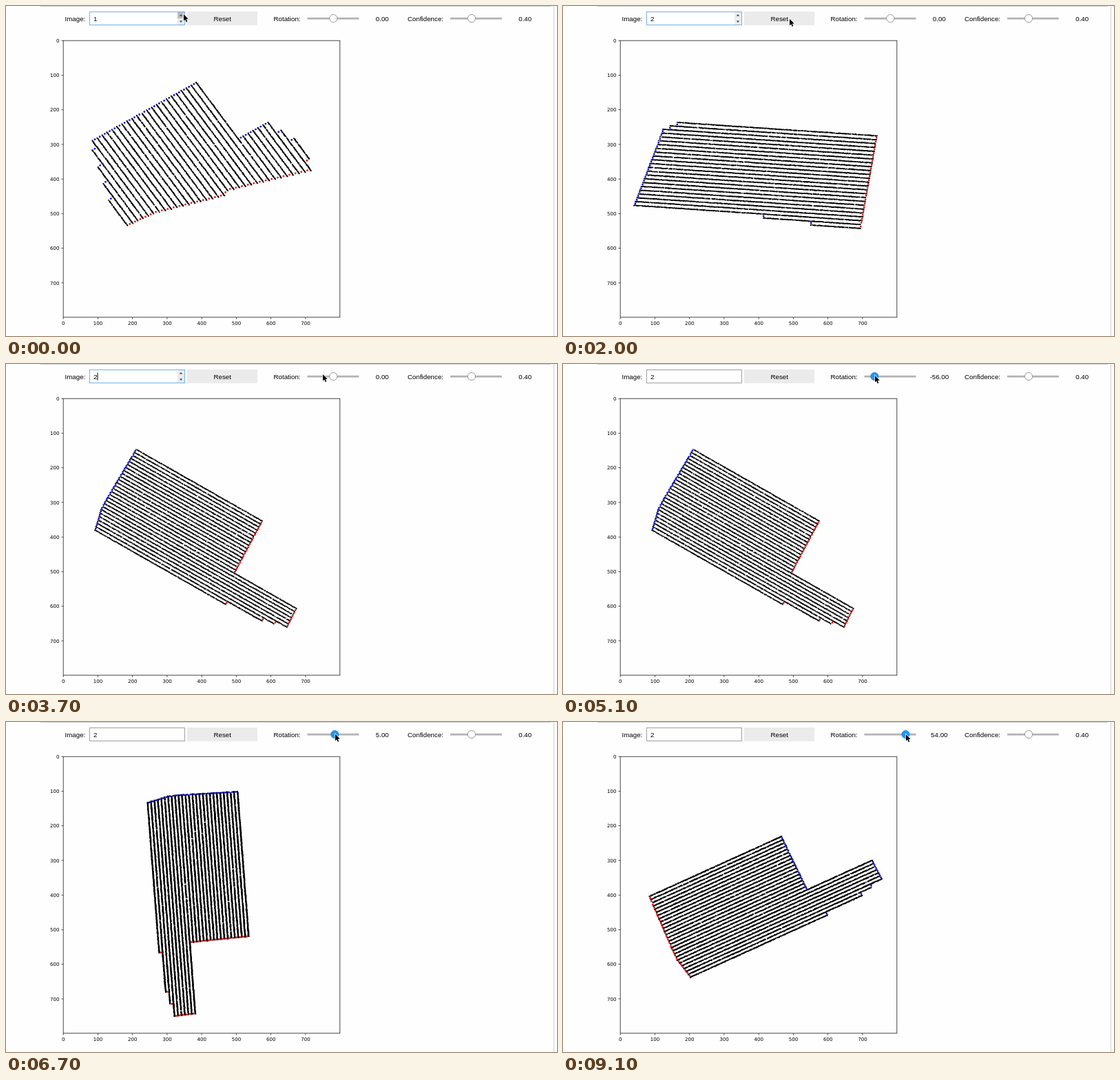
These frames come from a looping animation (800x479 px, 9900 ms). An HTML page with a canvas:

```html
<!DOCTYPE html>
<html lang="en">
<head>
<meta charset="utf-8">
<title>Row detection viewer</title>
<style>
html, body { margin: 0; width: 100%; height: 100%; overflow: hidden; background: #fefefe; }
canvas { display: block; }
</style>
</head>
<body>
<canvas id="stage" width="800" height="479"></canvas>
<script>
const ctx = document.getElementById('stage').getContext('2d');
const LOOP = 9900, CENTER = [284, 251], SCALE = 0.5025;
const UI_FONT = '9.75px "Liberation Sans", Arial, sans-serif';
const TICK_FONT = '7.1px "DejaVu Sans", sans-serif';

// Outline corners as [row index, x, y]: where rows start and where they end.
const fields = [
  { angle: 53.3, rows: 34,
    starts: [[0, 149, 282], [3, 125, 210], [4, 124, 196], [25, 276, 111],
             [26, 341, 191], [31, 381, 168], [33, 418, 192]],
    ends: [[0, 175, 320], [5, 212, 303], [17, 314, 278], [18, 322, 268], [32, 443, 239], [33, 440, 222]] },
  { angle: 3.85, rows: 25,
    starts: [[0, 166, 169], [2, 145, 179], [4, 141, 190], [22, 103, 290], [23, 291, 307], [24, 360, 318]],
    ends: [[0, 456, 188], [24, 432, 323]] },
  { angle: 29.6, rows: 27,
    starts: [[0, 189, 124], [16, 148, 193], [20, 137, 213], [26, 129, 241]],
    ends: [[0, 372, 228], [16, 334, 299], [17, 422, 354], [23, 408, 382], [25, 371, 374], [26, 319, 349]] }
];

const rad = deg => deg * Math.PI / 180;
const mix = (a, b, f) => a + (b - a) * f;
const dot = (p, q) => p[0] * q[0] + p[1] * q[1];

// Interpolates a list of [key, ...values] at the given key.
function sample(keys, at) {
  if (at <= keys[0][0]) return keys[0].slice(1);
  const i = keys.findIndex(k => k[0] >= at);
  if (i < 0) return keys[keys.length - 1].slice(1);
  const a = keys[i - 1], b = keys[i], f = (at - a[0]) / (b[0] - a[0]);
  return a.slice(1).map((v, j) => mix(v, b[j + 1], f));
}

function randomizer(seed) {
  return () => (seed = (seed * 16807) % 2147483647) / 2147483647;
}

function rotate([x, y], deg) {
  const c = Math.cos(rad(deg)), s = Math.sin(rad(deg));
  const dx = x - CENTER[0], dy = y - CENTER[1];
  return [CENTER[0] + dx * c - dy * s, CENTER[1] + dx * s + dy * c];
}

function addDot(path, [x, y]) {
  path.moveTo(x + 1.4, y);
  path.arc(x, y, 1.4, 0, 7);
}

function buildPlot({ angle, rows, starts, ends }, turn, width) {
  const rnd = randomizer(77);
  const plot = { plants: new Path2D(), top: new Path2D(), bottom: new Path2D() };
  const u = [Math.cos(rad(angle)), Math.sin(rad(angle))];
  const n = [-u[1], u[0]];
  const first = dot(sample(starts, 0), n), last = dot(sample(starts, rows - 1), n);
  const along = (corners, k) => dot(sample(corners, k), u);
  const place = (t, k) => {
    const side = mix(first, last, k / (rows - 1));
    return rotate([u[0] * t + n[0] * side, u[1] * t + n[1] * side], turn);
  };

  for (let k = 0; k < rows; k++) {
    const from = along(starts, k), to = along(ends, k);
    const a = place(from, k), b = place(to, k);
    const count = Math.round(to - from);
    for (let i = 0; i <= count; i++) {
      const w = width * mix(0.75, 1.1, rnd());
      const x = mix(a[0], b[0], i / count) + (rnd() - 0.5) * 0.6;
      const y = mix(a[1], b[1], i / count) + (rnd() - 0.5) * 0.6;
      if (rnd() > 0.06) plot.plants.rect(x - w / 2, y - w / 2, w, w);
    }
  }

  // Each gap is marked where both of its rows are present; blue is the upper end.
  const downward = Math.sin(rad(angle + turn)) > 0;
  for (let k = 0; k + 1 < rows; k++) {
    const head = Math.max(along(starts, k), along(starts, k + 1));
    const tail = Math.min(along(ends, k), along(ends, k + 1));
    addDot(plot.top, place(downward ? head : tail, k + 0.5));
    addDot(plot.bottom, place(downward ? tail : head, k + 0.5));
  }
  return plot;
}

const plots = [
  { from: 0, plot: buildPlot(fields[0], 0, 1.9) },
  { from: 700, plot: buildPlot(fields[1], 0, 1.9) },
  { from: 3300, plot: buildPlot(fields[2], 0, 1.8) },
  { from: 5700, plot: buildPlot(fields[2], 56, 2.5) },
  { from: 8200, plot: buildPlot(fields[2], -54, 2.1) }
];

const pointer = [[1900, 258, 12], [2500, 684, 52], [2900, 519, 31], [3700, 460, 15],
  [4200, 453, 17], [6200, 453, 17], [7100, 498, 18]];
const rotation = [[3900, 0], [4200, -56], [6200, -56], [7100, 54]];

function rect(x, y, w, h, fill, stroke) {
  ctx.fillStyle = fill;
  ctx.fillRect(x, y, w, h);
  if (stroke) {
    ctx.strokeStyle = stroke;
    ctx.lineWidth = 1;
    ctx.strokeRect(x + 0.5, y + 0.5, w - 1, h - 1);
  }
}

function text(str, x, y, align = 'left') {
  ctx.fillStyle = '#000';
  ctx.textAlign = align;
  ctx.fillText(str, x, y);
}

function polygon(points) {
  ctx.beginPath();
  points.forEach(([x, y]) => ctx.lineTo(x, y));
  ctx.closePath();
}

function drawSlider(left, thumb, active) {
  rect(left, 16.7, 75, 2.8, '#b3b3b3');
  ctx.beginPath();
  ctx.arc(thumb, 18, 5.6, 0, 7);
  ctx.fillStyle = active ? '#2196f3' : '#fff';
  ctx.fill();
  ctx.strokeStyle = active ? '#1e88e5' : '#999';
  ctx.lineWidth = 1;
  ctx.stroke();
}

function drawInput(t) {
  const focused = t < 4000, hover = t < 2000;
  const caret = (t + 1000) % 1100 < 500;
  rect(121, 8, 139, 20, '#fff', focused ? '#72b3ee' : '#9e9e9e');
  text(t < 1200 ? '1' : '2', 127, 21.5);
  if (!focused) return;
  if (caret) rect(132.5, 12.5, 1, 11, '#000');
  rect(249, 9, 10, 18, '#ececec');
  if (hover) rect(249, 9, 10, 9, '#bdbdbd');
  ctx.fillStyle = '#444';
  for (const dir of [-1, 1]) {
    const y = 18 + 3.5 * dir;
    polygon([[251.7, y], [256.3, y], [254, y + 2.6 * dir]]);
    ctx.fill();
  }
}

function drawToolbar(t) {
  ctx.font = UI_FONT;
  const turn = Math.round(sample(rotation, t)[0]);
  text('Image:', 85.5, 21.5);
  drawInput(t);
  rect(263, 8, 102, 20, '#ebebeb');
  text('Reset', 314.2, 21.5, 'center');
  text('Rotation:', 388.5, 21.5);
  drawSlider(437.5, 475.3 + turn * 0.41, t >= 4000);
  text(turn.toFixed(2), 546.3, 21.5, 'center');
  text('Confidence:', 583, 21.5);
  drawSlider(645, 676, false);
  text('0.40', 753.7, 21.5, 'center');
}

function drawAxes() {
  ctx.font = TICK_FONT;
  for (let v = 0; v < 800; v += 100) {
    const d = v * SCALE;
    rect(80.5, 49.8 + d, 2.5, 0.7, '#000');
    text(v, 77.5, 52.9 + d, 'right');
    rect(82.8 + d, 452, 0.7, 2.5, '#000');
    text(v, 83.2 + d, 462.6, 'center');
  }
  ctx.strokeStyle = '#333';
  ctx.lineWidth = 0.9;
  ctx.strokeRect(83.2, 50.2, 401.6, 401.6);
}

function drawPlot(t) {
  const { plot } = plots.filter(p => t >= p.from).pop();
  ctx.fillStyle = '#000';
  ctx.fill(plot.plants);
  ctx.fillStyle = '#00f';
  ctx.fill(plot.top);
  ctx.fillStyle = '#f00';
  ctx.fill(plot.bottom);
}

function drawPointer(t) {
  const [x, y] = sample(pointer, t);
  const arrow = [[0, 0], [0, 9.6], [2.2, 7.6], [3.7, 11.2], [5.3, 10.5], [3.8, 7.1], [6.7, 6.8]];
  polygon(arrow.map(([dx, dy]) => [x + dx, y + dy]));
  ctx.strokeStyle = '#fff';
  ctx.lineWidth = 1.4;
  ctx.stroke();
  ctx.fillStyle = '#000';
  ctx.fill();
}

function draw(now) {
  const t = Math.floor((now % LOOP) / 100) * 100;
  rect(0, 0, 800, 479, '#fefefe');
  rect(50, 0, 741, 1, '#cfcfcf');
  rect(795, 0, 1, 479, '#d0d0d0');
  drawToolbar(t);
  drawAxes();
  drawPlot(t);
  drawPointer(t);
}

const begin = performance.now();
function tick() {
  draw(performance.now() - begin);
  requestAnimationFrame(tick);
}
tick();
</script>
</body>
</html>
```
